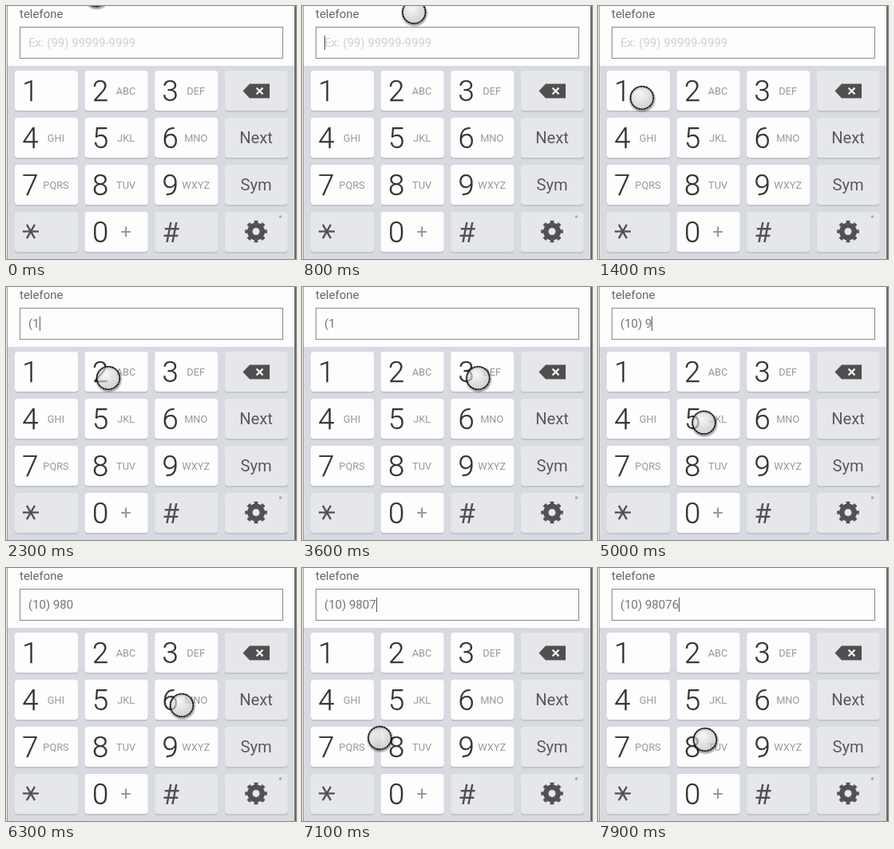
An HTML page for the animation above (8000 ms loop, 363 by 317 pixels).

```html
<!DOCTYPE html>
<html lang="pt">
<head>
<meta charset="utf-8">
<title>Teclado</title>
<style>
  html, body { margin: 0; width: 100%; height: 100%; overflow: hidden; background: #fdfdfd; }
  svg { display: block; font-family: Roboto, Arial, sans-serif; }
  .key { fill: #fdfdfe; }
  .key.grey { fill: #e5e7eb; }
  .key.down { fill: #d3d7de; }
  .shade { fill: #c2c5cc; }
  .digit { font-size: 36.5px; font-weight: 300; fill: #333; stroke: #333; stroke-width: .25; }
  .hash { font-size: 35px; font-weight: 400; fill: #505052; stroke: none; }
  .letters { font-size: 12.8px; fill: #999; text-anchor: middle; }
  .plus { font-size: 24px; }
  .word { font-size: 20.2px; fill: #595a5d; text-anchor: middle; }
  .field { font-size: 15px; }
</style>
</head>
<body>
<svg width="363" height="317" viewBox="0 0 363 317">
  <defs>
    <radialGradient id="ball" cx=".4" cy=".35" r=".7">
      <stop offset="0" stop-color="#f4f4f4"/>
      <stop offset="1" stop-color="#b4b4b4"/>
    </radialGradient>
    <radialGradient id="shadow">
      <stop offset=".72" stop-opacity="0"/>
      <stop offset=".82" stop-opacity=".4"/>
      <stop offset="1" stop-opacity="0"/>
    </radialGradient>
  </defs>
  <rect width="363" height="317" fill="#fdfdfd"/>
  <text class="field" x="17" y="15" fill="#666">telefone</text>
  <rect x="17.5" y="26.5" width="329" height="39" fill="#fdfdfd" stroke="#8a8a8a"/>
  <text class="field" id="hint" x="28" y="51" fill="#d0d0d0">Ex: (99) 99999-9999</text>
  <text class="field" id="value" x="28" y="51" fill="#757575"></text>
  <rect id="caret" y="37" width="1" height="18" fill="#555"/>
  <rect x="1" y="75" width="361" height="242" fill="#d7dae0"/>
  <g id="keys"></g>
  <path d="M296.500 106.500L305 97.500H330V115.500H305Z" fill="#4f4f50"/>
  <path d="M313.500 102.500l8 8m0-8l-8 8" stroke="#eee" stroke-width="2.400"/>
  <path id="arm" d="M21 282.500H41" stroke="#505052" stroke-width="2.300"/>
  <use href="#arm" transform="rotate(60 31 282.500)"/>
  <use href="#arm" transform="rotate(120 31 282.500)"/>
  <g fill="none" stroke="#525254">
    <circle cx="313" cy="282.500" r="7.700" stroke-width="6.400"/>
    <circle cx="313" cy="282.500" r="11.800" stroke-width="4" pathLength="16" stroke-dasharray="1 1" stroke-dashoffset=".5"/>
  </g>
  <circle cx="343.500" cy="264" r="1.800" fill="#a9abb0"/>
  <path d="M1.500 0V317" stroke="#a3917f"/>
  <path d="M362 0V317" stroke="#6a6a6c" stroke-width="2"/>
  <g id="touch">
    <circle cx=".5" cy="1.500" r="17.500" fill="url(#shadow)"/>
    <circle r="14.300" fill="url(#ball)" fill-opacity=".65"/>
    <circle r="14.300" fill="none" stroke="#111" stroke-width="1.600" stroke-dasharray="3 .4"/>
  </g>
</svg>
<script>
const $ = id => document.getElementById(id);
const LOOP = 8000, STEP = 100, CARET_TIME = 600;
const DIGITS = '1098076';
const FOCUS = 800;
const strokes = [1800, 3700, 4700, 5300, 5700, 6700, 7800];
const pressed = { 1: 1700, 7: 7700 };

// Pointer stops: departure, arrival, x, y
const stops = [
  [-100, 0, 113, -13.5],
  [200, 200, 126, -12.5],
  [300, 300, 170, -30],
  [700, 1200, 55, 115],
  [1600, 1900, 146, 117],
  [2300, 2300, 128, 114],
  [2400, 2800, 228, 112],
  [3600, 4300, 51, 160],
  [4700, 5100, 142, 171],
  [5600, 6000, 220, 172],
  [6700, 7300, 67, 223],
  [7700, 7900, 134, 215]
];

function add(tag, attrs, text = '') {
  const el = document.createElementNS('http://www.w3.org/2000/svg', tag);
  for (const name in attrs) el.setAttribute(name, attrs[name]);
  el.textContent = text;
  return $('keys').appendChild(el);
}

const labels = [
  ['1', '2 ABC', '3 DEF', ''],
  ['4 GHI', '5 JKL', '6 MNO', 'Next'],
  ['7 PQRS', '8 TUV', '9 WXYZ', 'Sym'],
  ['', '0 +', '#', '']
];
const keys = {};
labels.forEach((row, r) => row.forEach((label, c) => {
  const x = 11 + c * 87.6, y = 81 + r * 59;
  const grey = c === 3 || (r === 3 && c !== 1);
  const box = { x, width: 79, height: 50, rx: 4 };
  add('rect', { ...box, y: y + 2, class: 'shade' });
  const key = add('rect', { ...box, y, class: grey ? 'key grey' : 'key' });
  if (c === 3) {
    add('text', { x: x + 39.3, y: y + 32, class: 'word' }, label);
    return;
  }
  const [digit, letters] = label.split(' ');
  const plus = letters === '+';
  keys[digit] = key;
  add('text', { x: x + 9.3, y: y + 38, class: digit === '#' ? 'digit hash' : 'digit' }, digit);
  add('text', { x: x + 51.5, y: y + (plus ? 33 : 30), class: plus ? 'letters plus' : 'letters' }, letters);
}));

function phone(digits) {
  if (!digits) return '';
  const rest = digits.slice(2);
  return '(' + digits.slice(0, 2) + (rest && ') ' + rest);
}

function pointer(t) {
  const i = stops.findLastIndex(stop => stop[0] <= t);
  const [from, to, x, y] = stops[i];
  const [, , px, py] = stops[Math.max(0, i - 1)];
  const p = Math.min(1, (t - from + STEP) / (to - from + STEP));
  const s = p * p * (3 - 2 * p);
  return [px + (x - px) * s, py + (y - py) * s];
}

function draw(now) {
  const t = Math.floor((now % LOOP) / STEP) * STEP;
  const text = phone(DIGITS.slice(0, strokes.filter(time => time <= t).length));
  $('value').textContent = text;
  $('hint').style.display = text ? 'none' : '';

  const lit = [FOCUS, ...strokes].some(time => t >= time && t < time + CARET_TIME);
  const width = text ? $('value').getComputedTextLength() : 0;
  $('caret').setAttribute('x', Math.round(28 + width));
  $('caret').style.display = lit ? '' : 'none';

  for (const digit in pressed) keys[digit].classList.toggle('down', t === pressed[digit]);
  $('touch').setAttribute('transform', `translate(${pointer(t)})`);
}

const start = performance.now();
function tick() {
  draw(performance.now() - start);
  requestAnimationFrame(tick);
}
tick();
</script>
</body>
</html>
```
